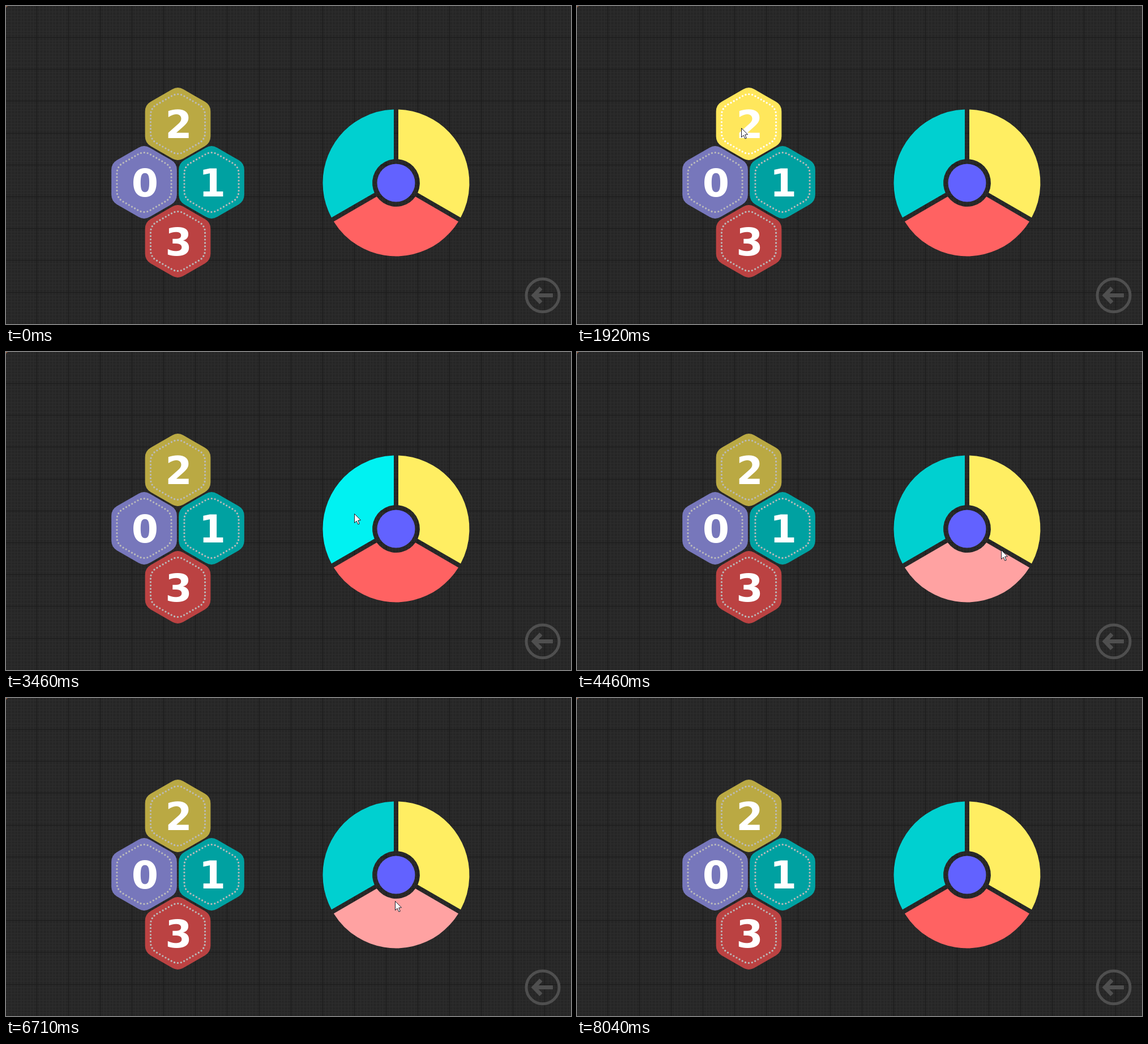
Animation, 998 px wide and 561 px high, one loop 8.65 s. Source, as an HTML page with a canvas:

```html
<!DOCTYPE html>
<html lang="en">
<head>
<meta charset="utf-8">
<title>Button shapes</title>
<style>
html, body { margin: 0; width: 100%; height: 100%; overflow: hidden; background: #262626; }
canvas { display: block; }
</style>
</head>
<body>
<canvas id="stage" width="998" height="561"></canvas>
<script>
const ctx = document.getElementById('stage').getContext('2d');
const LOOP = 8650, TICK = 77.2, TAU = Math.PI * 2;
const WHEEL = { x: 689, y: 312, outer: 129.5, inner: 42, hub: 33.5, gap: 4 };

const hexes = [
  { x: 244, y: 311, color: '#7777bb', hover: '#a3a3ff' },
  { x: 363, y: 311, color: '#00a1a1', hover: '#00dfdf' },
  { x: 303.5, y: 208, color: '#baa943', hover: '#ffe75c' },
  { x: 303.5, y: 415, color: '#bb4242', hover: '#ff5c5c' }
];

// Three sectors clockwise from the top, then the hub
const parts = [
  { color: '#ffee62', hover: '#fff5a2', press: '#d8c94f' },
  { color: '#ff6262', hover: '#ffa2a2', press: '#d84f4f' },
  { color: '#00d0d0', hover: '#00f2f2', press: '#00b0b0' },
  { color: '#6262ff', hover: '#a2a2ff', press: '#4f4fd8' }
];

// The pointer eases from stop to stop and clicks midway through each longer rest
const stop = (leave, arrive, x, y) => ({ leave, arrive, x, y });
const stops = [
  stop(0, 2, 169, 531),
  stop(2, 7, 240, 322), stop(13, 17, 392, 313), stop(20, 24, 290, 215), stop(27, 32, 304, 398),
  stop(39, 45, 615, 285), stop(47, 50, 690, 312),
  stop(54, 56, 775, 315), stop(56, 61, 694, 420), stop(61, 64, 688, 318),
  stop(64, 67, 628, 272), stop(73, 76, 688, 310), stop(79, 82, 687, 358),
  stop(87, 90, 755, 290), stop(93, 96, 690, 385), stop(100, 104, 676, 496)
];

const ease = k => k < 0.5 ? 2 * k * k : 1 - 2 * (1 - k) ** 2;

function pointerAt(n) {
  if (n < 2 || n >= 104) return null;
  const next = stops.findIndex(s => s.leave > n);
  const i = (next < 0 ? stops.length : next) - 1;
  const a = stops[i - 1], b = stops[i];
  const k = ease(Math.min(1, (n - b.leave) / (b.arrive - b.leave)));
  const rest = next < 0 ? 0 : stops[next].leave - b.arrive;
  const held = n - Math.round(b.arrive + rest / 2);
  return {
    x: a.x + (b.x - a.x) * k,
    y: a.y + (b.y - a.y) * k,
    held: rest > 2 && held >= 0 ? held : Infinity
  };
}

function inHex(p, h) {
  const dx = Math.abs(p.x - h.x), dy = Math.abs(p.y - h.y);
  return dx < 58 && dx / Math.sqrt(3) + dy < 67;
}

function partAt(p) {
  const dx = p.x - WHEEL.x, dy = p.y - WHEEL.y, d = Math.hypot(dx, dy);
  if (d > WHEEL.outer) return -1;
  if (d < 38) return 3;
  return Math.floor((Math.atan2(dx, -dy) + TAU) % TAU / (TAU / 3));
}

function polyline(points) {
  ctx.beginPath();
  points.forEach(([x, y]) => ctx.lineTo(x, y));
}

function drawGrid() {
  ctx.fillStyle = '#262626';
  ctx.fillRect(0, 0, 998, 561);
  const lines = (parts, color) => {
    ctx.fillStyle = color;
    for (let i = 0; i < 18 * parts; i++) {
      ctx.fillRect(Math.round(i * 56.1 / parts - 2.3), 0, 1, 561);
      ctx.fillRect(0, Math.round(i * 56.2 / parts - 1.2), 998, 1);
    }
  };
  lines(10, '#2d2d2d');
  lines(1, '#1b1b1b');
  ctx.fillStyle = '#94583c';
  polyline([[0, 0], [3, 0], [0, 3]]);
  ctx.fill();
}

function hexPath(h, r) {
  const corner = i => [h.x + r * Math.sin(i * TAU / 6), h.y - r * Math.cos(i * TAU / 6)];
  const a = corner(0), b = corner(1);
  ctx.beginPath();
  ctx.moveTo((a[0] + b[0]) / 2, (a[1] + b[1]) / 2);
  for (let i = 1; i <= 6; i++) ctx.arcTo(...corner(i), ...corner(i + 1), 20);
  ctx.closePath();
}

function drawHex(h, label, over, down) {
  hexPath(h, 66.8);
  ctx.fillStyle = over ? h.hover : h.color;
  ctx.fill();
  ctx.save();
  hexPath(h, 55.5);
  ctx.globalAlpha = down ? 0.4 : 1;
  ctx.strokeStyle = over ? '#fff' : '#bbb';
  ctx.lineWidth = 3.3;
  ctx.lineCap = 'round';
  const pitch = 320 / 54;
  ctx.setLineDash([0, pitch]);
  ctx.lineDashOffset = pitch / 2;
  ctx.stroke();
  ctx.restore();
  ctx.fillStyle = '#fff';
  ctx.font = 'bold 68px "DejaVu Sans", sans-serif';
  ctx.textAlign = 'center';
  ctx.fillText(label, h.x + 1.5, h.y + 25);
}

function drawPart(i, over, down) {
  const { x, y, outer, inner, hub, gap } = WHEEL, p = parts[i];
  ctx.beginPath();
  if (i === 3) ctx.arc(x, y, hub, 0, TAU);
  else {
    const from = i * TAU / 3 - TAU / 4, to = from + TAU / 3;
    const o = Math.asin(gap / outer), n = Math.asin(gap / inner);
    ctx.arc(x, y, outer, from + o, to - o);
    ctx.arc(x, y, inner, to - n, from + n, true);
    ctx.closePath();
  }
  ctx.fillStyle = down ? p.press : over ? p.hover : p.color;
  ctx.fill();
}

function drawBack() {
  ctx.strokeStyle = '#4f4f4f';
  ctx.lineWidth = 5;
  ctx.beginPath();
  ctx.arc(948, 510.5, 29, 0, TAU);
  ctx.stroke();
  ctx.lineWidth = 7;
  polyline([[966, 510.5], [933, 510.5]]);
  ctx.stroke();
  polyline([[945, 497.5], [932.5, 510.5], [945, 523.5]]);
  ctx.stroke();
}

function drawPointer(p) {
  ctx.save();
  ctx.translate(Math.round(p.x) + 0.5, Math.round(p.y) + 0.5);
  polyline([[0, 0], [0, 16], [3.6, 12.6], [6.4, 18.6], [8.8, 17.6], [6.2, 11.6], [11, 11.2]]);
  ctx.closePath();
  ctx.fillStyle = '#fff';
  ctx.fill();
  ctx.strokeStyle = '#1c1c28';
  ctx.lineWidth = 1;
  ctx.stroke();
  ctx.restore();
}

function draw(t) {
  const pointer = pointerAt(Math.floor((t + 20) / TICK));
  const active = pointer ? partAt(pointer) : -1;
  drawGrid();
  hexes.forEach((h, i) => {
    const over = pointer && inHex(pointer, h);
    drawHex(h, i, over, over && pointer.held < 1);
  });
  parts.forEach((p, i) => drawPart(i, i === active, i === active && pointer.held < 2));
  drawBack();
  if (pointer) drawPointer(pointer);
}

const start = performance.now();
function frame() {
  draw((performance.now() - start) % LOOP);
  requestAnimationFrame(frame);
}
frame();
</script>
</body>
</html>
```
